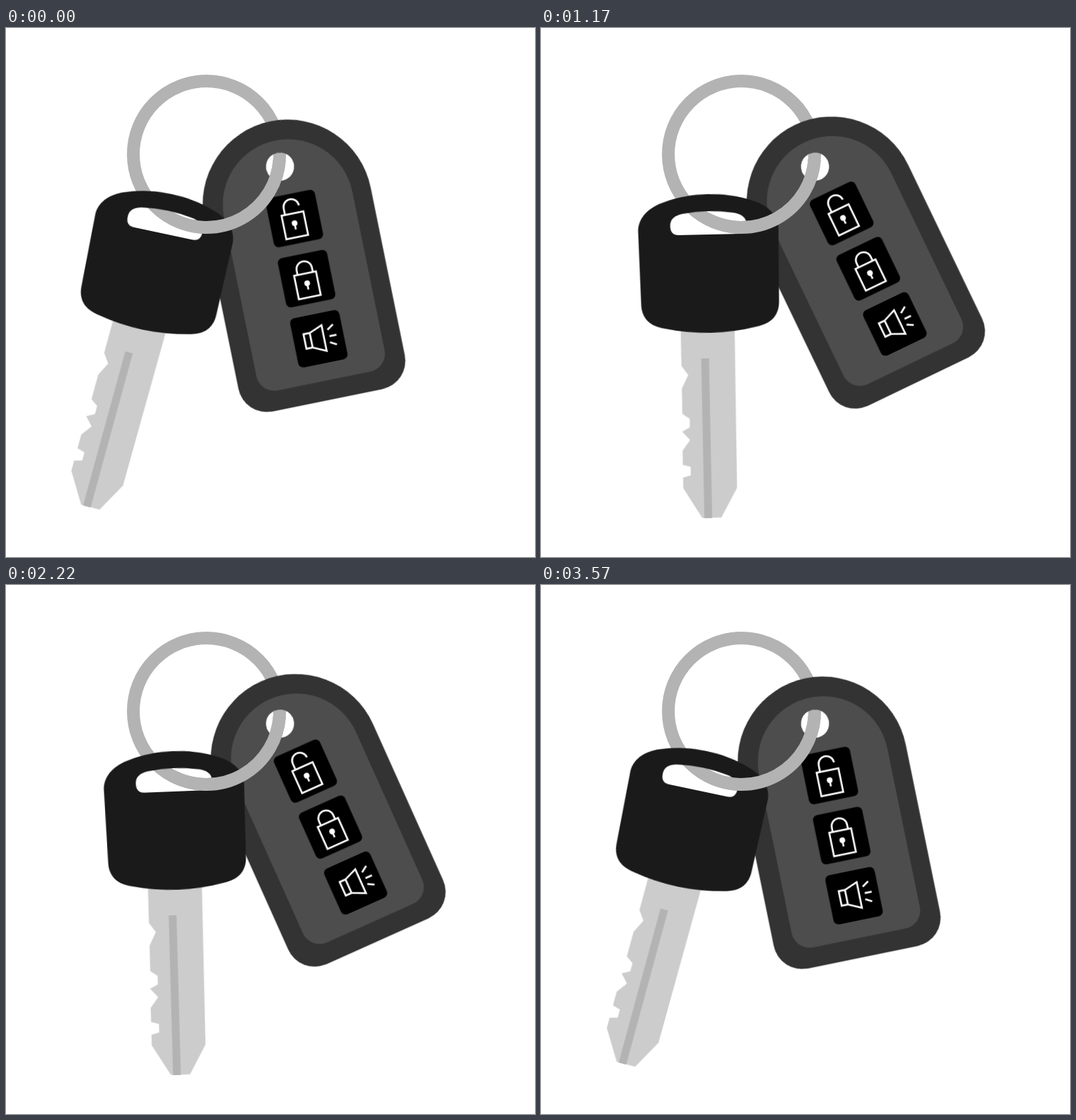
An HTML page for the animation above (3.6 s loop, 748 px wide and 748 px high).

```html
<!DOCTYPE html>
<html lang="en">
<head>
<meta charset="utf-8">
<title>Swinging keys</title>
<style>
html, body { margin: 0; width: 100%; height: 100%; overflow: hidden; background: #fff; }
svg { display: block; width: 100vw; height: 100vh; }
.icon { fill: none; stroke: #fff; stroke-width: 2.6; }
.dot { fill: #fff; stroke: none; }
.ring { fill: none; stroke: #b3b3b3; stroke-width: 18; }
#fob, #key, #blade { transform-origin: 0 0; }
</style>
</head>
<body>
<svg viewBox="0 0 748 748">
  <defs>
    <g id="body">
      <rect x="-16" y="-7.5" width="31.5" height="34"/>
      <circle class="dot" cy="6.5" r="4"/>
      <path d="M0 7V15.5"/>
    </g>
    <rect id="button" x="-35.5" y="-35.5" width="71" height="71" rx="7"/>
  </defs>

  <circle class="ring" cx="283.5" cy="178.5" r="103.5"/>

  <g transform="translate(387.5 196)">
    <g id="fob">
      <path id="shell" fill="#333" fill-rule="evenodd"/>
      <path id="panel" fill="#4d4d4d" fill-rule="evenodd"/>
      <g transform="translate(5.2 76)">
        <use href="#button"/>
        <g class="icon" transform="translate(-1)"><use href="#body"/><path d="M-11-7.5V-17A11 11 0 0 1 11-17"/></g>
      </g>
      <g transform="translate(5.2 162.7)">
        <use href="#button"/>
        <g class="icon" transform="translate(-.5)"><use href="#body"/><path d="M-11-7.5V-14A11 11 0 0 1 11-14V-7.5"/></g>
      </g>
      <g transform="translate(5.2 249.4)">
        <use href="#button"/>
        <path class="icon" transform="translate(-.5)" d="M-19.5-10.5H-10.5V10.5H-19.5ZM-10.5-10.5L8-18V19L-10.5 10.5M15-10L24-16M16-.5H26M15 8L24 13"/>
      </g>
    </g>
  </g>

  <g transform="translate(235.5 228)">
    <g id="key">
      <g transform="translate(0 177)">
        <g id="blade">
          <path fill="#ccc" d="M-42.4 0H34L32.8 246 9.8 287.5H-17.2L-43.2 245V230L-32.2 227V215L-43.2 212V192L-32.2 177-43.2 165-32.2 159V147L-42.4 140V104L-33 85-42.4 72Z"/>
          <path fill="#b3b3b3" d="M-14.2 62h11v226h-11z"/>
        </g>
      </g>
      <path fill="#1a1a1a" fill-rule="evenodd" d="M-99.500 57C-99 37-82 23-62 17C-42 10-22 7 0 7S42 10 62 17C82 23 99 37 99 57L97.500 160C97.500 182 84 192 66 195.500Q33 203 0 203T-66 195.500C-84 192-97.500 182-97.500 160Z
        M-54 51C-54 40-46 36-36 34Q0 28 36 34C46 36 54 40 54 51Q54 64 42 64H-42Q-54 64-54 51Z"/>
    </g>
  </g>

  <path class="ring" d="M386.7 186A103.5 103.5 0 0 1 234.9 269.9"/>
</svg>
<script>
const LOOP = 3600, STEP = 30;
const $ = id => document.getElementById(id);

// Arched plate with rounded lower corners and the ring hole at the origin
function plate(x, cy, R, bottom, r) {
  return `M${x - R} ${cy}A${R} ${R} 0 0 1 ${x + R} ${cy}V${bottom - r}` +
    `A${r} ${r} 0 0 1 ${x + R - r} ${bottom}H${x - R + r}` +
    `A${r} ${r} 0 0 1 ${x - R} ${bottom - r}Z` +
    'M-20 0A20 20 0 0 1 20 0A20 20 0 0 1-20 0Z';
}
$('shell').setAttribute('d', plate(-0.3, 54.5, 120, 337.2, 41));
$('panel').setAttribute('d', plate(0.6, 55, 92.5, 309.5, 26));

// Two swings per loop; the last way back is softer
const ease = (x1, x2) => `cubic-bezier(${x1}, 0, ${x2}, 1)`;
const soft = ease(0.25, 0.7);

function swing(id, rest, peak, out, back) {
  const easings = [out, back, out, soft, 'linear'];
  const frames = easings.map((easing, i) => ({
    transform: `rotate(${i % 2 ? peak : rest}deg)`, easing
  }));
  const anim = $(id).animate(frames, { duration: LOOP, fill: 'both' });
  anim.pause();
  return anim;
}

const swings = [
  swing('fob', -11.5, -31.7, ease(0.365, 0.365), ease(0.365, 0.365)),
  swing('key', 12, -12, ease(0.39, 0.39), ease(0.18, 0.37)),
  swing('blade', 3.3, -0.8, ease(0.3, 0.4), ease(0.45, 0.35))
];

const start = performance.now();
function tick() {
  const t = (performance.now() - start) % LOOP;
  for (const s of swings) s.currentTime = Math.floor(t / STEP) * STEP;
  requestAnimationFrame(tick);
}
tick();
</script>
</body>
</html>
```
